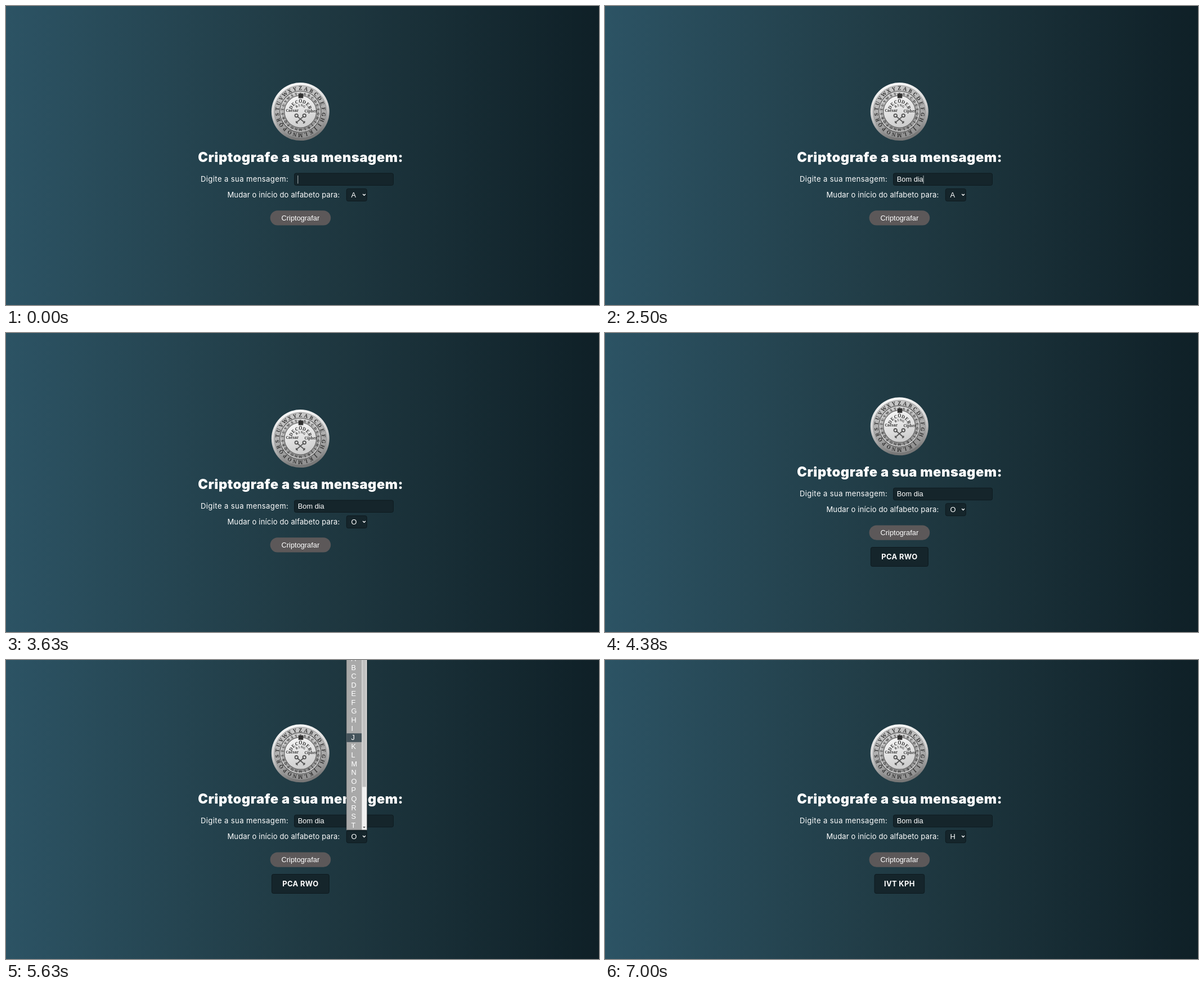
Recreate the animation shown at these times as an HTML page. Size 1054 px wide and 531 px high, loop 7870 ms.

```html
<!DOCTYPE html>
<html lang="pt">
<head>
<meta charset="utf-8">
<title>Criptografe a sua mensagem</title>
<style>
  html, body { margin: 0; height: 100%; overflow: hidden; }
  body { background: linear-gradient(to left, #0f2027, #203a43, #2c5364); }
  svg { display: block; width: 1054px; height: 531px; }
  text { fill: #fff; font: 12.8px "Liberation Sans", Arial, sans-serif; white-space: pre; }
  .label { font: 13px Inter, sans-serif; }
  .title { font: 900 23.7px Inter, sans-serif; letter-spacing: .54px; }
  .result { font: 700 13px Inter, sans-serif; letter-spacing: .3px; }
  .mid { text-anchor: middle; }
  .field { fill: #15252b; stroke: #0e1a1f; }
  #coin text { fill: #333; font: 700 8px "Noto Serif", serif; text-anchor: middle; }
  #popup { filter: drop-shadow(0 0 1.5px rgba(0, 0, 0, .35)); }
</style>
</head>
<body>
<svg viewBox="0 0 1054 531">
  <defs>
    <linearGradient id="rim" x2=".2" y2="1">
      <stop stop-color="#fff"/><stop offset=".55" stop-color="#d0d0d0"/><stop offset="1" stop-color="#777"/>
    </linearGradient>
    <linearGradient id="band" x2=".2" y2="1">
      <stop stop-color="#cfcfcf"/><stop offset="1" stop-color="#929292"/>
    </linearGradient>
    <linearGradient id="face" x2=".3" y2="1">
      <stop stop-color="#fafafa"/><stop offset="1" stop-color="#cfcfcf"/>
    </linearGradient>
  </defs>
  <g id="page">
    <g id="coin" transform="translate(523.3 187.6)">
      <circle r="51.5" fill="url(#rim)"/>
      <circle r="46.5" fill="url(#band)" stroke="#8c8c8c" stroke-width=".8"/>
      <circle r="36.5" fill="url(#band)" stroke="#5e5e5e" stroke-width="1.4"/>
      <circle r="35" fill="none" stroke="#e4e4e4" stroke-width="1.2"/>
      <circle r="28.5" fill="url(#face)" stroke="#6d6d6d" stroke-width="1.4"/>
      <rect x="-3.5" y="-32" width="8.5" height="8" fill="#303030"/>
      <g fill="none" stroke="#555" stroke-width="1.8">
        <path d="M-8 20L6 8M8 20L-6 8M-8 17l3 4M8 17l-3 4"/>
        <circle cx="-7" cy="7" r="2.8"/><circle cx="7" cy="7" r="2.8"/>
      </g>
      <text x="-14.5" y="0" style="font-size:6.6px">Caesar</text>
      <text x="18.5" y="1" style="font-size:6.6px">Cipher</text>
    </g>
    <text class="title mid" x="523.7" y="276.5">Criptografe a sua mensagem:</text>
    <text class="label" x="346" y="312" letter-spacing=".42">Digite a sua mensagem:</text>
    <rect class="field" x="512.5" y="297" width="176" height="21.5" rx="3"/>
    <text id="message" x="518.8" y="312"></text>
    <rect id="caret" y="301" width="1" height="14.5" fill="#b4bbbe"/>
    <text class="label" x="393.4" y="340" letter-spacing=".16">Mudar o início do alfabeto para:</text>
    <rect class="field" x="605.3" y="324.5" width="36" height="22" rx="3"/>
    <text id="choice" x="613.5" y="339.8"></text>
    <path d="M634.2 333.9l2.4 2.4 2.4-2.4" fill="none" stroke="#fff" stroke-width="1.4"/>
    <rect x="469.6" y="363.2" width="107.6" height="26.3" rx="13.15" fill="#5c5859"/>
    <text class="mid" x="523.4" y="380.6">Criptografar</text>
    <g id="output">
      <rect id="frame" class="field" y="402.3" height="34" rx="3"/>
      <text id="cipher" class="result mid" x="523.4" y="424.2"></text>
    </g>
    <g id="popup">
      <rect x="605.3" y="11.8" width="36" height="311.7" fill="#a9a9a9" stroke="#858585" stroke-width=".8"/>
      <rect id="mark" x="605.3" width="27.2" height="15.56" fill="#44535b"/>
      <g id="options"></g>
      <rect x="632.5" y="12.2" width="8.6" height="311" fill="#f1f1f1"/>
      <rect id="thumb" x="633.4" y="20.8" width="6.6" height="226.4"/>
      <path d="M634.4 17.8h4.4l-2.2-2.4z" fill="#a3a3a3"/>
      <path d="M634.4 317.8h4.4l-2.2 2.4z" fill="#444"/>
    </g>
  </g>
</svg>
<script>
const LOOP = 7870, ROW = 15.56, LIST_TOP = 12;
const ALPHABET = "ABCDEFGHIJKLMNOPQRSTUVWXYZ";
const $ = id => document.getElementById(id);

function addText(parent, content, attributes) {
  const node = document.createElementNS("http://www.w3.org/2000/svg", "text");
  node.textContent = content;
  for (const name in attributes) node.setAttribute(name, attributes[name]);
  parent.append(node);
}

// Letters stand upright on a circle, clockwise from the given angle.
function arc(letters, radius, size, start, step) {
  [...letters].forEach((letter, i) => addText($("coin"), letter, {
    transform: `rotate(${start + i * step}) translate(0 ${-radius})`,
    style: `font-size:${size}px`
  }));
}

const turn = 360 / 26;
arc(ALPHABET, 38.3, 9, turn, turn);
arc(ALPHABET, 30, 6, turn, turn);
arc("DECODER", 15.5, 8, -66, 22);
arc("RING", 9.5, 5.5, -36, 24);

[...ALPHABET.slice(0, 20)].forEach((letter, i) =>
  addText($("options"), letter, { x: 613.5, y: LIST_TOP + i * ROW + 11.8 }));

// Each step changes only the listed parts; marked is the lit option of the open list.
const steps = [
  [0, { message: "", caret: 518.3, choice: "A", marked: "", hover: false, cipher: "", width: 0 }],
  [210, { caret: 0 }],
  [460, { message: "B", caret: 527 }],
  [960, { message: "Bo", caret: 534.4 }],
  [1130, { message: "Bom", caret: 544.8 }],
  [2500, { message: "Bom dia", caret: 565.5 }],
  [2750, { caret: 0, marked: "A" }],
  [3130, { marked: "Q" }],
  [3250, { marked: "P" }],
  [3420, { marked: "O" }],
  [3630, { marked: "", choice: "O" }],
  [4380, { cipher: "PCA RWO", width: 102 }],
  [5130, { marked: "O" }],
  [5380, { hover: true }],
  [5460, { hover: false, marked: "K" }],
  [5630, { marked: "J" }],
  [5750, { marked: "I" }],
  [5790, { marked: "H" }],
  [6130, { marked: "", choice: "H" }],
  [7000, { cipher: "IVT KPH", width: 88.6 }]
];

const show = (id, visible) => $(id).setAttribute("display", visible ? "inline" : "none");

function draw() {
  const time = performance.now() % LOOP;
  const state = {};
  for (const [start, change] of steps) if (time >= start) Object.assign(state, change);

  for (const id of ["message", "choice", "cipher"]) $(id).textContent = state[id];
  show("caret", state.caret);
  $("caret").setAttribute("x", state.caret);
  show("output", state.cipher);
  $("frame").setAttribute("x", 523.4 - state.width / 2);
  $("frame").setAttribute("width", state.width);
  $("page").setAttribute("transform", `translate(0 ${state.cipher ? -21.8 : 0})`);
  show("popup", state.marked);
  $("mark").setAttribute("y", LIST_TOP + ALPHABET.indexOf(state.marked || "A") * ROW);
  $("thumb").setAttribute("fill", state.hover ? "#a8a8a8" : "#c1c1c1");
  requestAnimationFrame(draw);
}
draw();
</script>
</body>
</html>
```
